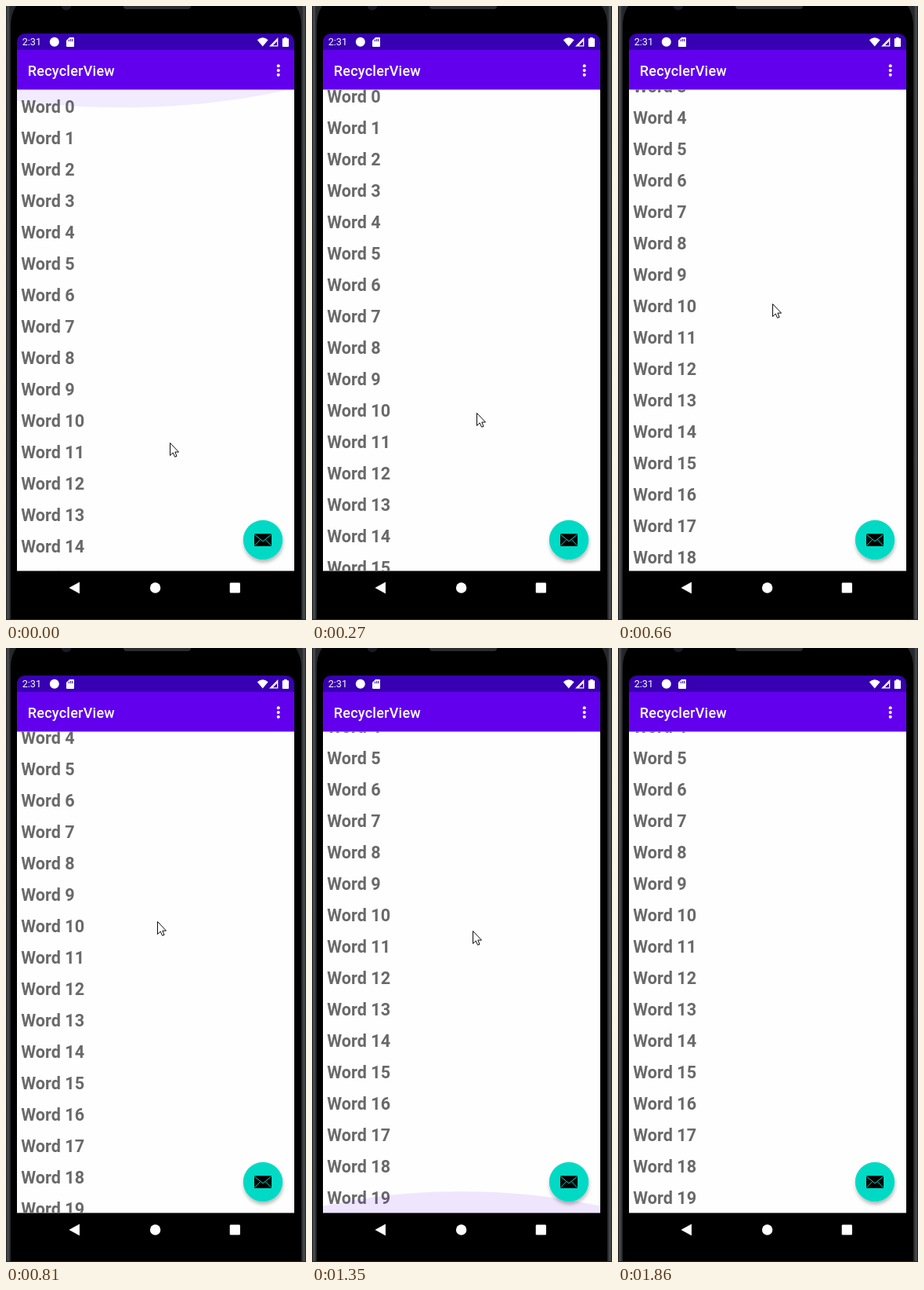
These frames come from a looping animation (383 px wide and 782 px high, 2140 ms). An HTML page:

```html
<!DOCTYPE html>
<html lang="en">
<head>
<meta charset="utf-8">
<title>Scrolling list</title>
<style>
  html, body { margin: 0; width: 100%; height: 100%; overflow: hidden; background: #000; }
  svg { display: block; width: 100%; height: 100%; }
  text { font-family: Roboto, sans-serif; }
  #list text { font-size: 21.6px; font-weight: 700; fill: #696969; }
</style>
</head>
<body>
<svg viewBox="0 0 383 782">
  <defs>
    <clipPath id="screen"><path d="M14 782V47Q14 35 26 35H356Q368 35 368 47V782Z"/></clipPath>
    <clipPath id="view"><rect x="14" y="106.5" width="354" height="613"/></clipPath>
    <filter id="shadow" x="-30%" y="-30%" width="160%" height="170%">
      <feDropShadow dx="0.5" dy="3.5" stdDeviation="2" flood-color="#000" flood-opacity=".27"/>
    </filter>
    <linearGradient id="rim">
      <stop offset="0" stop-color="#1b1d1f"/>
      <stop offset=".006" stop-color="#4d5054"/>
      <stop offset=".014" stop-color="#25282a"/>
      <stop offset=".986" stop-color="#25282a"/>
      <stop offset=".994" stop-color="#4d5054"/>
      <stop offset="1" stop-color="#1b1d1f"/>
    </linearGradient>
  </defs>

  <!-- phone body -->
  <rect width="383" height="782" fill="url(#rim)"/>
  <path d="M6 782V26Q6 10 13 0H370Q377 10 377 26V782Z" fill="#000"/>
  <rect x="150" y="-6" width="86" height="10" rx="4" fill="#2b2c2e"/>
  <circle cx="77" cy="-1" r="6.5" fill="#191a24"/>
  <rect y="781" width="383" height="1" fill="#252a31"/>

  <g clip-path="url(#screen)">
    <rect x="14" y="35" width="354" height="22" fill="#3700b3"/>
    <rect x="14" y="56" width="354" height="51" fill="#6200ee"/>
    <rect x="14" y="106.5" width="354" height="613" fill="#fefefe"/>
  </g>

  <!-- status bar -->
  <g fill="#fff">
    <text x="20.7" y="50.4" font-size="12.6">2:31</text>
    <circle cx="61.8" cy="45.8" r="6"/>
    <path d="M81 40H86.2Q87 40 87 41V51Q87 52 86 52H78Q77 52 77 51V44Z"/>
    <path d="M80.3 42.7v2.5M82.4 42v3.2M84.5 42v3.2" stroke="#3700b3" stroke-width="1"/>
    <path d="M320.8 43.2Q327.7 37.4 334.6 43.2L327.7 51.6Z"/>
    <path d="M347.3 40V51.4H336Z"/>
    <path d="M340.8 50.3L346 45V50.3Z" fill="#3700b3"/>
    <path d="M355 40h3.6v1.2h1.6q.8 0 .8 .8V51q0 .9-.8 .9h-6.6q-.8 0-.8-.9V42q0-.8 .8-.8H355Z"/>
  </g>

  <!-- app bar -->
  <text x="27.8" y="89" font-size="18.03" font-weight="500" letter-spacing=".225" fill="#fff">RecyclerView</text>
  <g fill="#fff">
    <circle cx="347.7" cy="76.3" r="2"/>
    <circle cx="347.7" cy="82" r="2"/>
    <circle cx="347.7" cy="87.7" r="2"/>
  </g>

  <g clip-path="url(#view)">
    <g id="list"></g>
    <ellipse id="glow" rx="425" fill="#6200ee"/>
  </g>

  <!-- floating button -->
  <circle cx="328" cy="680" r="25.2" fill="#03dac5" filter="url(#shadow)"/>
  <rect x="317" y="672.3" width="22" height="15.6" rx="1" fill="#000"/>
  <path d="M317.4 673.2L328 681.8 338.6 673.2M317.4 687.2L324.8 679.6M338.6 687.2L331.2 679.6" fill="none" stroke="#03dac5" stroke-width="1"/>

  <!-- navigation bar -->
  <g fill="#fff">
    <path d="M81 741L93.7 734V748Z" stroke="#fff" stroke-width=".6" stroke-linejoin="round"/>
    <circle cx="190.6" cy="741" r="6.7"/>
    <rect x="285.7" y="734.4" width="13.2" height="13.2" rx="1.3"/>
  </g>

  <path id="cursor" d="M.5 .5V16.5L4.2 13 6.6 18.3 9 17.3 6.8 12.1H11.5Z" fill="#fff" stroke="#0a0a0a" stroke-width="1"/>
</svg>
<script>
  const LOOP = 2140, TOP = 106.5, BOTTOM = 719.5, ROW = 40, END = 187.5;
  const $ = id => document.getElementById(id);
  const list = $('list'), glow = $('glow'), cursor = $('cursor');

  // [start ms, scroll, pointer x, pointer y, overscroll stretch]
  const poses = [
    [0, 0, 209, 556, .4],
    [120, 0, 209, 558, 0],
    [270, 13, 210, 518, 0],
    [390, 46, 208, 480, 0],
    [540, 89, 204, 433, 0],
    [660, 145.5, 197, 379, 0],
    [810, 174, 193, 348, 0],
    [930, END, 190, 316, .05],
    [1080, END, 185, 250, .72],
    [1230, END, 190, 278, .67],
    [1350, END, 205, 360, .48],
    [1470, END, 224, 469, .29],
    [1590, END, 244, 596, .1],
    [1710, END, 266, 721, 0],
    [1860, END, 0, -40, 0]
  ];

  for (let i = 0; i < 20; i++) {
    const row = document.createElementNS('http://www.w3.org/2000/svg', 'text');
    row.setAttribute('x', 19.3);
    row.setAttribute('y', 135.7 + i * ROW);
    row.textContent = 'Word ' + i;
    list.append(row);
  }

  // A shallow arc at the list edge, flattened by the stretch
  function drawGlow(stretch, atEnd) {
    const lift = 368 * stretch;
    glow.setAttribute('cx', atEnd ? 191 : 148);
    glow.setAttribute('cy', atEnd ? BOTTOM + lift : TOP - lift);
    glow.setAttribute('ry', 425 * stretch);
    glow.setAttribute('fill-opacity', .2 * stretch);
  }

  function draw(ms) {
    const [, scroll, x, y, stretch] = poses.findLast(p => p[0] <= ms);
    list.setAttribute('transform', `translate(0 ${-scroll})`);
    cursor.setAttribute('transform', `translate(${x} ${y})`);
    drawGlow(stretch, scroll === END);
  }

  const start = performance.now();
  function tick() {
    draw((performance.now() - start) % LOOP);
    requestAnimationFrame(tick);
  }
  tick();
</script>
</body>
</html>
```
